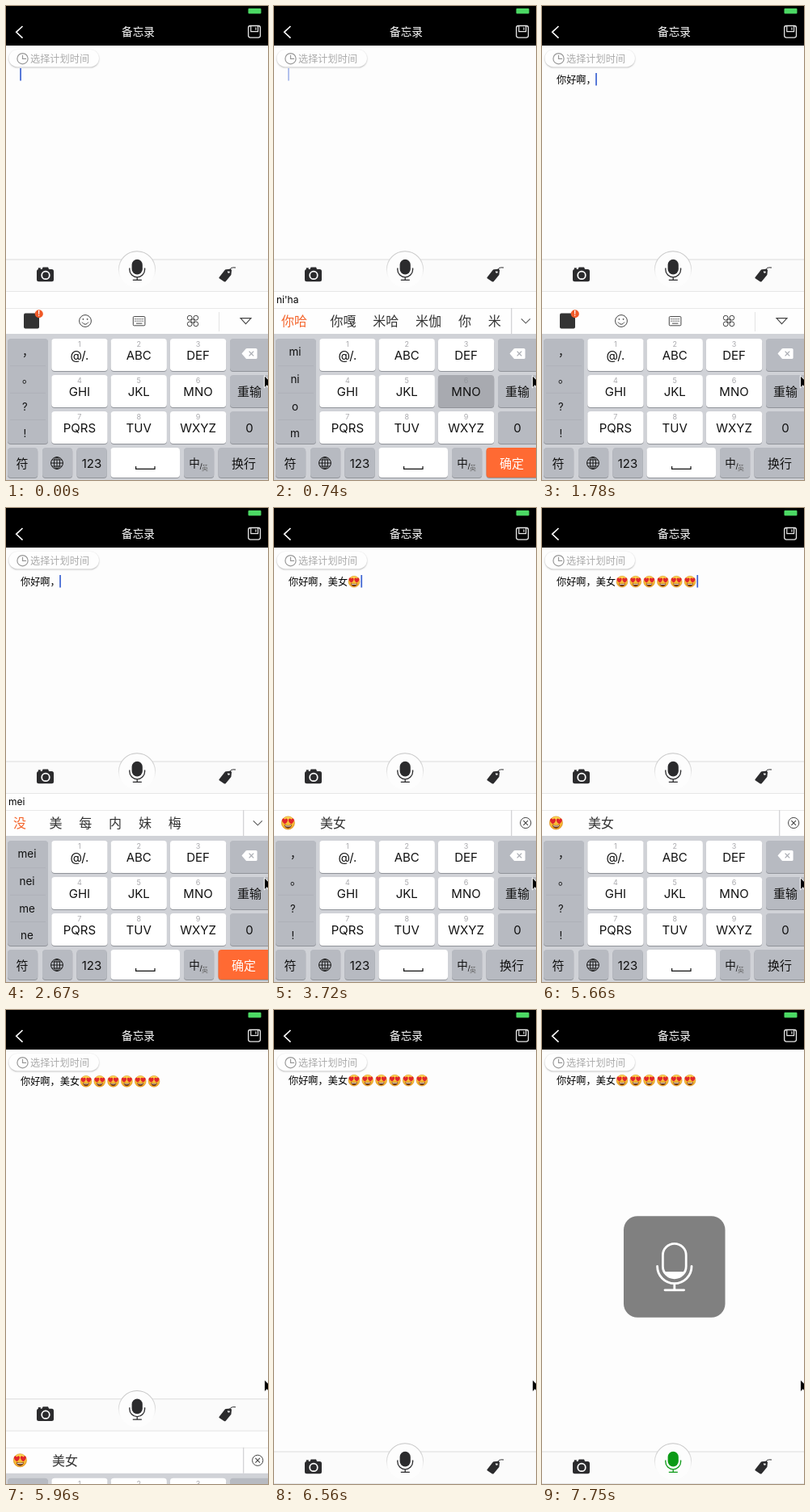
Recreate the animation shown at these times as an HTML page with a canvas. Size 324x587 px, loop 8 s.

```html
<!DOCTYPE html>
<html lang="zh-CN">
<head>
<meta charset="utf-8">
<title>备忘录</title>
<style>
html, body { margin: 0; width: 100%; height: 100%; overflow: hidden; background: #fdfdfd; }
canvas { display: block; width: 324px; height: 587px; }
</style>
</head>
<body>
<canvas id="stage"></canvas>
<script>
const W = 324, H = 587, LOOP = 8000;
const canvas = document.getElementById('stage');
const ctx = canvas.getContext('2d');
const dpr = window.devicePixelRatio || 1;
canvas.width = W * dpr;
canvas.height = H * dpr;

const FONT = 'Inter, "Noto Sans CJK SC", "Noto Sans CJK", sans-serif';
const INK = '#2b2b2d', ORANGE = '#f4652c', BOARD = '#d0d2d7', GREY_KEY = '#b7bac1', DOWN = '#a8aab0';
const PUNCT = ['，', '。', '?', '!'];

// Each row changes part of the state from its time on.
const steps = [
  [0, { text: '', hearts: 0, pinyin: '', words: [], side: PUNCT, press: '', bar: 'tools', caret: 1, slide: 0, level: -1 }],
  [150, { pinyin: 'n', bar: 'words', words: ['你', '哦', '吗', '嗯', '没', '那'], side: ['o', 'm', 'n', '6'], press: 'MNO' }],
  [300, { pinyin: 'ni', words: ['你', '米', '哦', '密', '呢', '迷'], side: ['mi', 'ni', 'o', 'm'], press: '' }],
  [590, { pinyin: "ni'ha", words: ['你哈', '你嘎', '米哈', '米伽', '你', '米'], caret: 0 }],
  [740, { press: 'MNO', caret: 0.45 }],
  [880, { pinyin: "ni'hao", words: ['你好', '你号', '拟好', '米高', '你', '米'], press: '', caret: 1 }],
  [1030, { pinyin: "ni'hao'a", words: ['你好啊', '你好', '拟好', '你', '米'], press: 'ABC' }],
  [1330, { text: '你好啊', pinyin: '', bar: 'next', words: ['我', '你', '亲', '是'], side: PUNCT, press: '' }],
  [1630, { text: '你好啊，', bar: 'tools', press: '，' }],
  [1780, { press: '' }],
  [2080, { pinyin: 'm', bar: 'words', words: ['我', '哦', '吗', '嗯', '没', '那'], side: ['o', 'm', 'n', '6'], press: 'MNO' }],
  [2230, { pinyin: 'me', words: ['么', '哦', '额', '没', '呢', '们'], side: ['me', 'ne', 'o', 'm'], press: 'DEF' }],
  [2530, { pinyin: 'mei', words: ['没', '美', '每', '内', '妹', '梅'], side: ['mei', 'nei', 'me', 'ne'], press: '' }],
  [2680, { pinyin: "mei'n", words: ['每年', '美女', '没你', '内呢', '没', '美'], press: 'MNO' }],
  [2820, { pinyin: "mei'nv", words: ['美女', '没女', '每女', '魅女', '没', '美'], press: '' }],
  [3120, { text: '你好啊，美女', pinyin: '', bar: 'smile', words: ['们', '你好', '图片', '在吗', '是'], side: PUNCT }],
  [3720, { hearts: 1, words: ['美女'] }],
  [3870, { hearts: 2 }],
  [4020, { hearts: 3 }],
  [4320, { hearts: 4, press: 'smile' }],
  [4470, { hearts: 5 }],
  [4620, { hearts: 6, press: '' }],
  [5060, { caret: 0.45 }],
  [5210, { caret: 0 }],
  [5510, { caret: 0.45 }],
  [5660, { caret: 1 }],
  [5810, { caret: 0, slide: 0.16 }],
  [5960, { slide: 0.72 }],
  [6110, { slide: 0.99 }],
  [6410, { slide: 1 }],
  [7010, { level: 0 }],
  [7460, { level: 4 }],
  [7750, { level: 6.5 }]
];

function stateAt(time) {
  const s = {};
  for (const [at, change] of steps) if (at <= time) Object.assign(s, change);
  return s;
}

function rect(x, y, w, h, color) {
  ctx.fillStyle = color;
  ctx.fillRect(x, y, w, h);
}

function round(x, y, w, h, r, fill, stroke, width = 1) {
  ctx.beginPath();
  ctx.roundRect(x, y, w, h, r);
  paint(fill, stroke, width);
}

function disc(x, y, r, fill, stroke, width = 1) {
  ctx.beginPath();
  ctx.arc(x, y, r, 0, Math.PI * 2);
  paint(fill, stroke, width);
}

function path(d, fill, stroke, width = 1) {
  const p = new Path2D(d);
  if (fill) { ctx.fillStyle = fill; ctx.fill(p); }
  if (stroke) { ctx.strokeStyle = stroke; ctx.lineWidth = width; ctx.stroke(p); }
}

function paint(fill, stroke, width) {
  if (fill) { ctx.fillStyle = fill; ctx.fill(); }
  if (stroke) { ctx.strokeStyle = stroke; ctx.lineWidth = width; ctx.stroke(); }
}

function label(str, x, y, size, color = '#111', align = 'center', weight = 400) {
  ctx.font = `${weight} ${size}px ${FONT}`;
  ctx.fillStyle = color;
  ctx.textAlign = align;
  ctx.fillText(str, x, y + size * 0.37);
}

function at(x, y, draw, scale = 1) {
  ctx.save();
  ctx.translate(x, y);
  ctx.scale(scale, scale);
  draw();
  ctx.restore();
}

function smile(x, y, r) {
  at(x, y, () => {
    const g = ctx.createLinearGradient(0, -10, 0, 10);
    g.addColorStop(0, '#ffdf55');
    g.addColorStop(1, '#f0a020');
    disc(0, 0, 9.6, g, '#d98a1c', 0.8);
    for (const side of [-1, 1]) at(side * 4.7, -2.6, () => {
      path('M0 4.4C-6 .6-4.6-4.2-1.8-3.8Q-.4-3.6 0-2.2Q.4-3.6 1.8-3.8C4.6-4.2 6 .6 0 4.4Z', '#e0262c');
    });
    path('M-5.4 2.8Q0 4.6 5.4 2.8Q4.6 8 0 8Q-4.6 8-5.4 2.8Z', '#6b3213');
    path('M-4.4 3.6Q0 5 4.4 3.6L4 4.8Q0 6-4 4.8Z', '#fff');
  }, r / 10);
}

function header() {
  rect(0, 0, W, 49, '#000');
  round(299.5, 3, 16, 6.5, 1, '#4cd964');
  path('M20.5 25L12.7 32.3L20.5 39.6', null, '#fff', 1.6);
  label('备忘录', 163.5, 31.5, 13.6, '#fff', 'center', 500);
  round(299.7, 24.5, 14.8, 14.6, 2.5, null, '#e8e8e8', 1.3);
  path('M302.8 25V31.6H311.6V25M309 26.5V29.8', null, '#e8e8e8', 1.2);
}

function note(s) {
  ctx.save();
  ctx.shadowColor = 'rgba(0,0,0,.28)';
  ctx.shadowBlur = 2 * dpr;
  ctx.shadowOffsetY = 0.8 * dpr;
  round(3.5, 54, 111.5, 21.5, 10.7, '#fefefe');
  ctx.restore();
  disc(20.5, 65.2, 6.6, null, '#999', 1.2);
  path('M20.5 60.8V65.4H25', null, '#999', 1.2);
  label('选择计划时间', 30, 65.2, 12.2, '#ababab', 'left');

  const y = 91 - 4 * s.slide;
  label(s.text, 18, y, 12.2, '#000', 'left');
  const end = 18 + 12.2 * s.text.length;
  for (let i = 0; i < s.hearts; i++) smile(end + 7.8 + 16.8 * i, y + 0.2, 7.2);
  if (s.caret) {
    ctx.globalAlpha = s.caret;
    const x = s.text ? end + 16.8 * s.hearts - 0.6 : 17.2;
    rect(x, s.text ? 83 : 77, 1.7, 15.5, '#3c63d2');
    ctx.globalAlpha = 1;
  }
}

function mic(color) {
  round(155.6, 313.8, 13.2, 18.6, 6.6, color);
  path('M152.8 324.5V326.4A9.4 9.4 0 0 0 171.6 326.4V324.5M162.2 335.8V339.2M156.8 339.4H167.8', null, color, 1.3);
}

function tools(s) {
  rect(0, 313.5, W, 40, '#fbfbfb');
  rect(0, 313.5, W, 1, '#dedede');
  rect(0, 353, W, 1, '#e6e6e6');
  disc(162, 326.3, 22.6, '#fdfdfd');
  const g = ctx.createLinearGradient(0, 304, 0, 338);
  g.addColorStop(0, '#c4c4c4');
  g.addColorStop(0.6, '#dedede');
  g.addColorStop(1, 'rgba(240,240,240,0)');
  disc(162, 326.3, 22.6, null, g, 1.1);
  mic(s.level < 0 ? INK : '#0c9a16');

  // camera
  round(38, 326, 21, 15.3, 2.5, INK);
  path('M44 327L45.6 323.6H52L53.6 327Z', INK);
  rect(39.8, 324.3, 3, 2, INK);
  disc(49, 333.4, 4.8, null, '#fff', 1.7);

  // tag
  path('M263.6 336L270.4 327.2Q271 326.4 272 326.3L277.6 325.8Q279 326 279 327.4L278.4 333L271.6 341.2Q270.6 342 269.6 341.2L264 337.6Q263 337 263.6 336Z', INK);
  disc(275.4, 329.4, 1.3, '#fff');
  path('M275.6 329.2Q276.5 322.8 284 324', null, INK, 1);
}

function toolIcons() {
  round(22, 380.5, 19, 19, 2, '#333');
  disc(40.8, 381.2, 5, '#f05a28');
  label('!', 40.8, 381.2, 8.5, '#fff', 'center', 700);

  disc(98, 390, 7.4, null, '#444', 1);
  disc(95.4, 387.8, 0.9, '#444');
  disc(100.6, 387.8, 0.9, '#444');
  path('M94 391.5Q98 397 102 391.5', null, '#444', 1);

  round(157.3, 384.6, 14.6, 11.2, 1, null, '#444', 1);
  for (let i = 0; i < 5; i++) {
    rect(159.3 + i * 2.3, 387, 1.2, 1.2, '#444');
    rect(159.3 + i * 2.3, 389.6, 1.2, 1.2, '#444');
  }
  rect(161, 392.6, 7.4, 1, '#444');

  for (const dx of [-1, 1]) for (const dy of [-1, 1]) disc(231 + dx * 3.8, 390 + dy * 3.8, 2.9, null, '#444', 1);
  ctx.strokeStyle = '#444';
  ctx.strokeRect(229, 388, 4, 4);
  rect(263, 379, 1, 24, '#e4e4e4');
  path('M290 386.6H303L296.5 393.6Z', null, '#444', 1.1);
}

function wordBar(s) {
  if (s.press === 'smile') rect(0, 375, 41, 31, '#e3e4e6');
  let x = 9;
  s.words.forEach((word, i) => {
    if (s.bar === 'smile' && i === 0) {
      smile(17.4, 390, 8.4);
      x = 57;
    }
    label(word, x, 390, 16, s.bar === 'words' && i === 0 ? ORANGE : '#333', 'left');
    x += word.length * 16 + (i === 0 && s.bar !== 'smile' ? 28.5 : 20.8);
  });
  rect(293, 374, 1.3, 32, '#d4d4d6');
  if (s.bar === 'words') {
    path('M305.8 387.4L311.3 392.8L316.8 387.4', null, '#555', 1.1);
  } else {
    disc(311.2, 390, 6.6, null, '#444', 1);
    path('M308.4 387.2L314 392.8M314 387.2L308.4 392.8', null, '#444', 1.1);
  }
}

function key(x, y, w, h, color) {
  round(x, y + 1, w, h, 4, '#909399');
  round(x, y, w, h, 4, color);
}

function sideKeys(s) {
  key(2, 412, 50, 130, GREY_KEY);
  if (s.press === '，') round(2, 412, 50, 33, [4, 4, 0, 0], DOWN);
  for (let i = 1; i < 4; i++) rect(5, 412 + i * 33.4, 44, 0.8, '#adb0b7');
  s.side.forEach((str, i) => {
    const y = 428.5 + i * 33.6;
    if (s.side === PUNCT) label(str, i < 2 ? 27 : 23.3, i < 2 ? y - 1 : y, i < 2 ? 14 : 13);
    else label(str, 26, y, 13.5);
  });
}

function keyboard(s) {
  rect(0, 353, W, 234, '#fefefe');
  rect(0, 353, W, 1, '#e6e6e6');
  rect(0, 374, W, 1, '#e9e9e9');
  label(s.pinyin, 3, 363.5, 12, '#000', 'left');
  if (s.bar === 'tools') toolIcons();
  else wordBar(s);

  rect(0, 406, W, 181, BOARD);
  sideKeys(s);
  ['@/.', 'ABC', 'DEF', 'GHI', 'JKL', 'MNO', 'PQRS', 'TUV', 'WXYZ'].forEach((name, i) => {
    const x = 56.3 + (i % 3) * 73.3, y = 412 + 45 * Math.floor(i / 3);
    const down = s.press === name;
    key(x, y, 69.3, 40, down ? DOWN : '#fff');
    label(i + 1, x + 34.6, y + 6.6, 9, down ? '#96989e' : '#a9a9ad');
    label(name, x + 34.6, y + 20.2, 15);
  });

  for (let i = 0; i < 3; i++) key(277, 412 + 45 * i, 54, 40, GREY_KEY);
  path('M291.5 430.4L296.6 424.6Q297.2 424 298 424H309Q310.6 424 310.6 425.6V435.4Q310.6 437 309 437H298Q297.2 437 296.6 436.4Z', '#fff');
  path('M300.6 427.7L306.2 433.3M306.2 427.7L300.6 433.3', null, '#a5a8af', 1.2);
  label('重输', 301, 477.3, 15);
  label('0', 301, 522.3, 15);

  const typing = s.bar === 'words';
  key(2, 547, 37.2, 37, GREY_KEY);
  key(45, 547, 37.2, 37, GREY_KEY);
  key(87.5, 547, 37.2, 37, GREY_KEY);
  key(129.5, 547, 85.5, 37, '#fff');
  key(220, 547, 37.2, 37, GREY_KEY);
  key(262.5, 547, 68, 37, typing ? '#ff6a33' : GREY_KEY);
  label('符', 20, 566, 15);
  label('123', 106, 566, 15);
  path('M160.6 570V573.4H184V570', null, '#111', 1.2);
  label('中', 233, 566, 13.5);
  label('/', 241, 570, 9);
  label('英', 246, 572, 7.8, '#666');
  label(typing ? '确定' : '换行', 294, 566, 15, typing ? '#fff' : '#111');

  disc(63, 566, 7.4, null, '#111', 1);
  ctx.beginPath();
  ctx.ellipse(63, 566, 3.6, 7.4, 0, 0, Math.PI * 2);
  paint(null, '#111', 1);
  path('M55.6 566H70.4M63 558.6V573.4M57 562H69M57 570H69', null, '#111', 0.9);
}

function recorder(level) {
  round(101, 255.3, 125.5, 125.5, 17, '#808080');
  ctx.save();
  ctx.beginPath();
  ctx.roundRect(149.4, 289.3, 28.8, 42.5, 14.4);
  ctx.clip();
  rect(149, 330.6 - level, 30, level + 2, '#fff');
  ctx.restore();
  round(149.4, 289.3, 28.8, 42.5, 14.4, null, '#fff', 2.8);
  ctx.lineCap = 'round';
  path('M142.6 317.5A21.2 21.2 0 0 0 185 317.5M163.8 339V346.6M152 346.8H175.6', null, '#fff', 2.8);
  ctx.lineCap = 'butt';
}

function pointer() {
  path('M319.4 457.8V473L322.8 469.8L325.2 475L328 474L326 469H331Z', '#000', '#fff', 1);
}

function draw(time) {
  const s = stateAt(time);
  ctx.setTransform(dpr, 0, 0, dpr, 0, 0);
  rect(0, 0, W, H, '#fdfdfd');
  header();
  note(s);
  at(0, 233 * s.slide, () => {
    tools(s);
    if (s.slide < 1) keyboard(s);
  });
  if (s.level >= 0) recorder(s.level);
  pointer();
}

const start = performance.now();
function tick() {
  draw((performance.now() - start) % LOOP);
  requestAnimationFrame(tick);
}
tick();
</script>
</body>
</html>
```
